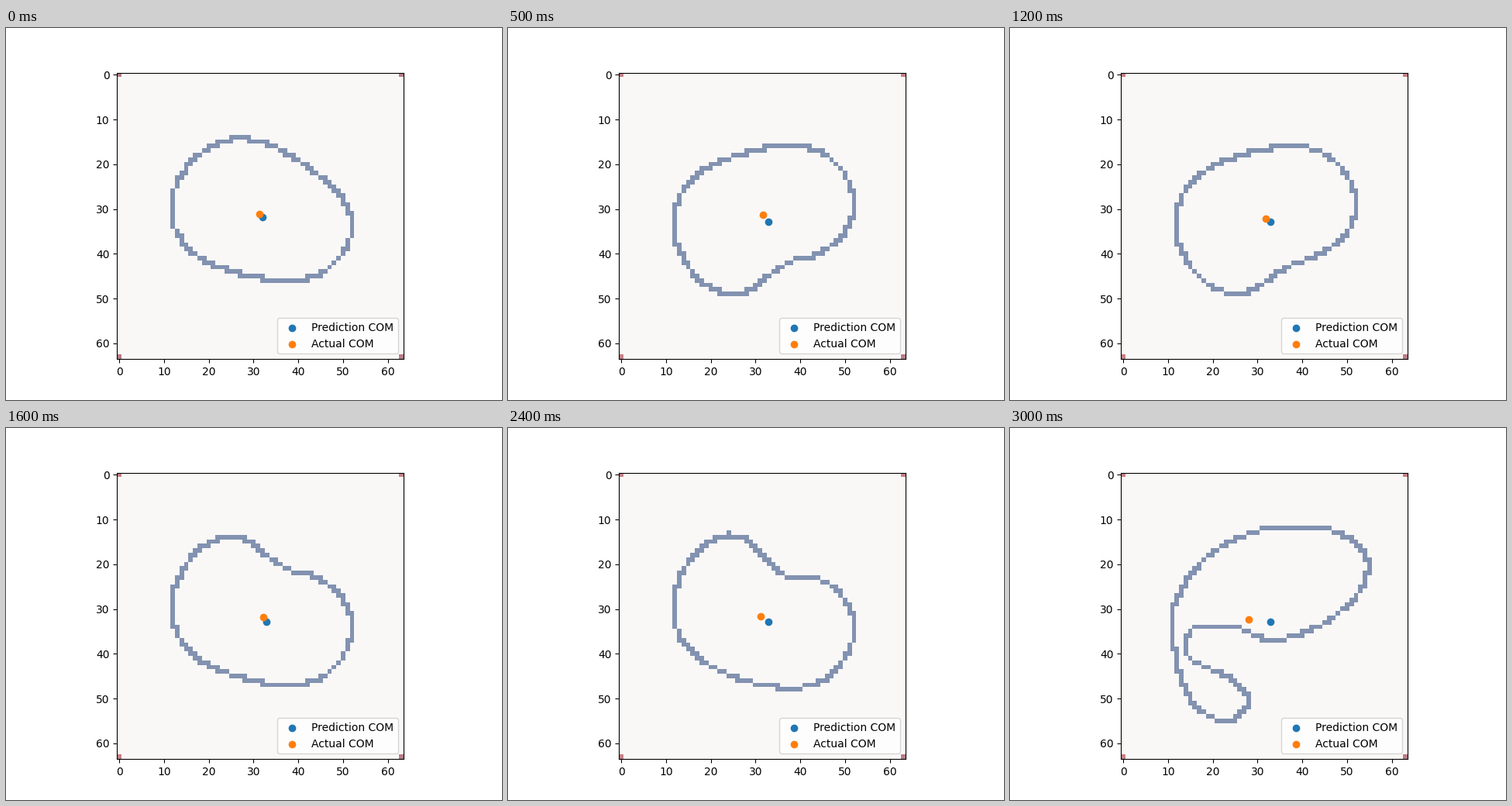
A matplotlib script that plays this animation: 640x480 px, repeating every 3100 ms.

```python
import numpy as np
import matplotlib.pyplot as plt
from matplotlib.animation import FuncAnimation
from matplotlib.colors import to_rgb

SIZE = 64
FRAMES = 31
SAMPLES = 320
CURL_START = 27

PAPER = to_rgb("#faf8f7")
EDGE = to_rgb("#8292b0")
CORNER = to_rgb("#c97f86")
CORNER_DARK = to_rgb("#b87c87")

# frame, depth of the dent, centre of mass x and y
KEYS = np.array([
    (0, 0.0, 31.35, 31.1),
    (5, 3.2, 31.75, 31.3),
    (8, 4.8, 31.6, 31.6),
    (12, 2.6, 31.9, 32.15),
    (16, 3.2, 32.2, 31.85),
    (20, 3.8, 31.0, 31.65),
    (24, 5.0, 31.2, 31.65),
    (30, 5.0, 28.05, 32.35),
])

# Corners of the curled final outline, clockwise from the left.
CURL = [
    (11, 35), (12.3, 27.3), (19, 18.2), (31, 12.4), (45.5, 12.2),
    (54.2, 18), (52.8, 26), (45.5, 32.8), (34, 37), (25, 34.2),
    (16, 34.1), (14.6, 40.6), (24, 45.7), (27.9, 51), (22.5, 55.2),
    (14.5, 49.3)]


def resample(curve):
    """Points spread evenly along a closed curve."""
    curve = np.vstack([curve, curve[:1]])
    length = np.r_[0, np.cumsum(np.hypot(*np.diff(curve, axis=0).T))]
    s = np.linspace(0, length[-1], SAMPLES, endpoint=False)
    return np.column_stack([np.interp(s, length, c) for c in curve.T])


def smooth_closed(points):
    """Catmull-Rom curve through the points."""
    p1 = np.array(points, float)[:, None]
    p0, p2, p3 = (np.roll(p1, k, axis=0) for k in (1, -1, -2))
    t = np.linspace(0, 1, 30, endpoint=False)[None, :, None]
    curve = 0.5 * (2 * p1 + (p2 - p0) * t
                   + (2 * p0 - 5 * p1 + 4 * p2 - p3) * t**2
                   + (3 * p1 - p0 - 3 * p2 + p3) * t**3)
    return curve.reshape(-1, 2)


def cell_height(t, dent):
    """Height of a tilted oval, pressed in at its upper right."""
    u = -np.cos(t)
    middle = (31.1 + 2.2 * np.sin(2.2 * u) - 0.8 * np.cos(np.pi * u)
              + 0.12 * dent * u)
    radius = 15.2 - 1.3 * u - 0.3 * u**2 + 0.3 * dent
    bump = 1.35 * dent * np.exp(-((u - 0.22) / 0.36)**2)
    return middle - radius * np.sin(t) + np.where(np.sin(t) > 0, bump, 0)


def cell_outline(dent, flip):
    t = np.linspace(0, 2 * np.pi, 600, endpoint=False)
    upright = cell_height(t, dent)
    mirrored = SIZE - 1 - cell_height(-t, dent)
    y = (1 - flip) * upright + flip * mirrored
    return resample(np.column_stack([31.85 - 20.1 * np.cos(t), y]))


CURLED = resample(smooth_closed(CURL))


def pose_at(i):
    dent, *centre = (np.interp(i, KEYS[:, 0], c) for c in KEYS[:, 1:].T)
    flip = np.clip(0.5 - 0.75 * np.cos(np.pi * i / 4), 0, 1)
    curl = np.clip((i - CURL_START) / (FRAMES - 1 - CURL_START), 0, 1)**2
    outline = (1 - curl) * cell_outline(dent, flip) + curl * CURLED
    return outline, centre


def grid(i, outline):
    img = np.full((SIZE, SIZE, 3), PAPER)
    img[::SIZE - 1, ::SIZE - 1] = CORNER if i else CORNER_DARK
    img[-1, -1] = CORNER_DARK
    x, y = np.rint(outline).astype(int).T
    img[y, x] = EDGE
    return img


fig, ax = plt.subplots(figsize=(6.4, 4.8), dpi=100)
outline, centre = pose_at(0)
image = ax.imshow(grid(0, outline), interpolation="nearest")
predicted = ax.scatter(32.0, 31.8, color="C0", label="Prediction COM")
actual = ax.scatter(*centre, color="C1", label="Actual COM")
ax.set_xlim(-0.5, SIZE - 0.5)
ax.set_ylim(SIZE - 0.5, -0.5)
ax.legend(loc="lower right")


def update(i):
    outline, centre = pose_at(i)
    image.set_data(grid(i, outline))
    predicted.set_offsets([(32.9, 32.85) if i else (32.0, 31.8)])
    actual.set_offsets([centre])
    return image, predicted, actual


anim = FuncAnimation(fig, update, frames=FRAMES, interval=100, repeat=True,
                     repeat_delay=0)
plt.show()
```
